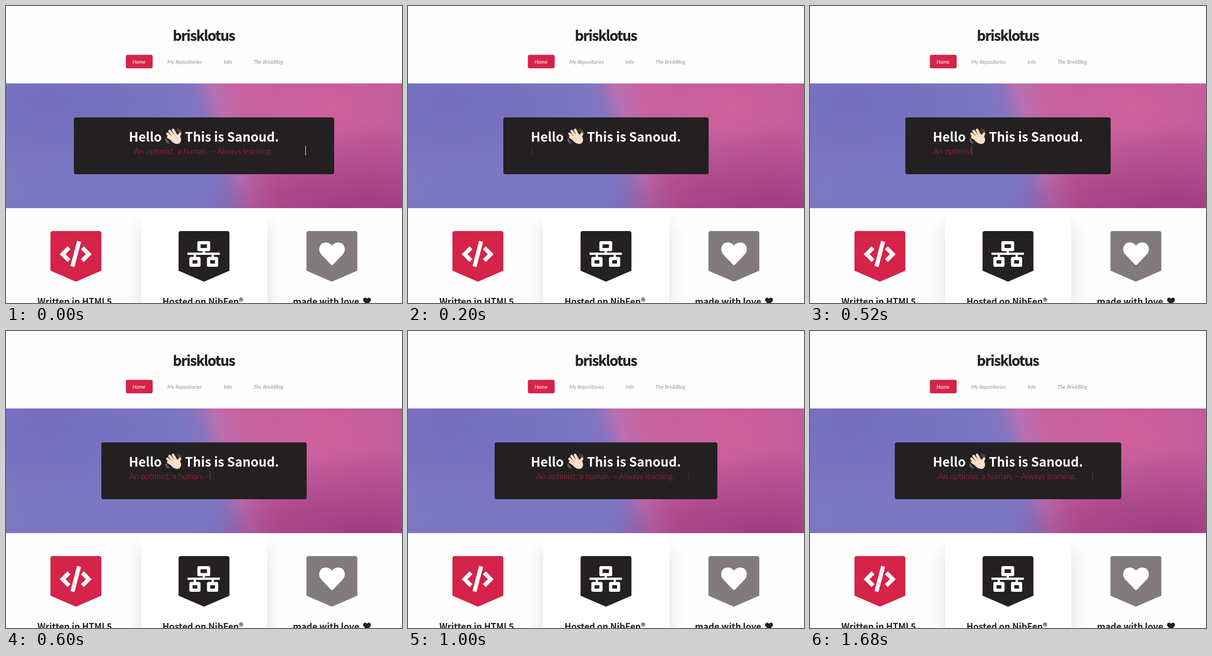
Write an HTML page that moves like this. It is 864 px wide and 648 px high and loops after 2000 ms.

```html
<!DOCTYPE html>
<html lang="en">
<head>
<meta charset="utf-8">
<title>brisklotus</title>
<style>
html, body { margin: 0; width: 100%; height: 100%; overflow: hidden; background: #fefefe; }
#page { position: relative; width: 864px; height: 648px; overflow: hidden; }
#page > * { position: absolute; }
#hero {
  left: 0; top: 169px; width: 864px; height: 272px;
  background:
    radial-gradient(ellipse 130px 80px at 705px 55px, #d5609acc, #d5609a00),
    radial-gradient(ellipse 370px 215px at 790px 300px, #a23f84 20%, #a23f8400),
    radial-gradient(ellipse 130px 150px at 620px 290px, #a0458aaa, #a0458a00),
    radial-gradient(ellipse 300px 140px at 90px 40px, #746cc0, #746cc000),
    linear-gradient(72deg, #7d76c1 0, #7b76c3 48%, #8474bf 52%, #b870b1 56.5%, #c8639f 62%, #c25c9b 100%);
}
#card {
  left: 294.5px; top: 441px; width: 275px; height: 260px;
  background: #fff; box-shadow: 0 36px 36px rgba(0, 0, 0, .13);
}
svg { left: 0; top: 0; }
.bold { font: 700 19.2px "Noto Sans CJK JP", "Noto Sans CJK SC", "Noto Sans", sans-serif; fill: #252122; }
.logo { font-size: 30.5px; letter-spacing: -1.6px; text-anchor: middle; stroke: #252122; stroke-width: .5; }
.hello { font-size: 27.7px; fill: #fff; }
.nav { font: italic 400 11.5px Lato, sans-serif; fill: #989194; }
.typed { font: 300 17.3px Lato, sans-serif; fill: #d52349; }
.icon { fill: none; stroke: #fff; }
.fingers { fill: none; stroke-linecap: round; stroke-linejoin: round; }
</style>
</head>
<body>
<div id="page">
  <div id="hero"></div>
  <div id="card"></div>
  <svg width="864" height="648">
    <defs>
      <path id="badge" d="M5 0H106Q111 0 111 5V86.500L55.500 110.500 0 86.500V5Q0 0 5 0Z"/>
      <path id="heart" d="M28 7C20-3 9 0 5 3C-2 10-1 20 4.500 26L25.500 48Q28 50.500 30.500 48L51.500 26C57 20 58 10 51 3C47 0 36-3 28 7Z"/>
      <path id="hand" d="M372 284L364.500 270.500M368 287L357 273M364 290L352.500 279M365 293L354 286M377 292Q376 284 379.500 279M364 286L375 283Q382 291 377 297Q371 300 363 293Z"/>
      <clipPath id="clip"><rect id="reveal" y="300" height="35"/></clipPath>
    </defs>

    <text class="bold logo" x="431.500" y="76">brisklotus</text>
    <rect x="261.500" y="106.500" width="58.500" height="29.500" rx="4" fill="#d52349"/>
    <g class="nav">
      <text x="276" y="126" style="fill:#fff">Home</text>
      <text x="352" y="126">My Repositories</text>
      <text x="475" y="126">Info</text>
      <text x="540" y="126">The BriskBlog</text>
    </g>

    <rect id="box" y="243" height="124" rx="4.500" fill="#242021"/>
    <text class="bold hello" x="268" y="295.700">Hello</text>
    <text class="bold hello" x="390.500" y="295.700">This is Sanoud.</text>
    <g class="fingers">
      <use href="#hand" stroke="#c6a48f" stroke-width="6"/>
      <use href="#hand" stroke="#f6dfcb" stroke-width="5" fill="#f6dfcb"/>
      <path d="M373 272Q378 273 379 276M374 268Q381 270 382 277M350 290Q351 295 356 297M348.500 290Q349 298 356 300" stroke="#a08f86" stroke-width="1.200"/>
    </g>
    <g clip-path="url(#clip)"><text id="typed" class="typed" y="322.500">An optimist, a human. ~ Always learning.</text></g>
    <rect id="caret" y="305" width="1.300" height="21"/>

    <use href="#badge" x="97" y="491" fill="#d52349"/>
    <use href="#badge" x="376.500" y="491" fill="#252122"/>
    <use href="#badge" x="655.500" y="491" fill="#837a7d"/>
    <path class="icon" stroke-width="9" d="M137.500 527.500L123.500 541.500 137.500 555.500M166.500 527.500L180.500 541.500 166.500 555.500M159.500 513.500L145 568.500"/>
    <g class="icon" stroke-width="7" stroke-linejoin="round">
      <rect x="421" y="516.500" width="21" height="15"/>
      <rect x="403.500" y="551" width="17.500" height="14.500"/>
      <rect x="442" y="551" width="17.500" height="14.500"/>
      <path stroke-width="5" d="M396 540.500H466.500M431.500 534V540M412 541V549M451 541V549"/>
    </g>
    <use href="#heart" x="683.300" y="516" fill="#fff"/>

    <g class="bold">
      <text x="68.500" y="651.500">Written in HTML5</text>
      <text x="341.500" y="651.500">Hosted on NibFen®</text>
      <text x="626" y="651.500">made with love</text>
      <use href="#heart" transform="translate(779 636.500) scale(.31)"/>
    </g>
  </svg>
</div>
<script>
const STEP = 200, LOOP = 2000, CENTER = 432;
// half: half the box width; typed: revealed width while typing
const poses = [
  { half: 284, caret: "#dcd7d4" },
  { half: 224, typed: 0, caret: "#403b3c" },
  { half: 224, typed: 83, caret: "#504a4b" },
  { half: 224, typed: 175.5, caret: "#544c4f" },
  { half: 224, typed: 268.5, caret: "#5c4e52" },
  { half: 243, caret: "#352e30" },
  { half: 247, caret: "#4a4445" }
];
const el = id => document.getElementById(id);
const set = (id, attrs) => {
  for (const key in attrs) el(id).setAttribute(key, attrs[key]);
};

function draw(time) {
  const index = Math.min(Math.floor(time % LOOP / STEP), poses.length - 1);
  const { half, typed, caret } = poses[index];
  const typing = typed !== undefined;
  const textX = typing ? 269 : 280;
  set("box", { x: CENTER - half, width: 2 * half });
  set("typed", { x: textX });
  set("reveal", { x: textX - 2, width: typing ? typed + 2 : 330 });
  set("caret", { x: typing ? 269.5 + typed : CENTER + half - 63, fill: caret });
}

const start = performance.now();
function tick() {
  draw(performance.now() - start);
  requestAnimationFrame(tick);
}
tick();
</script>
</body>
</html>
```
